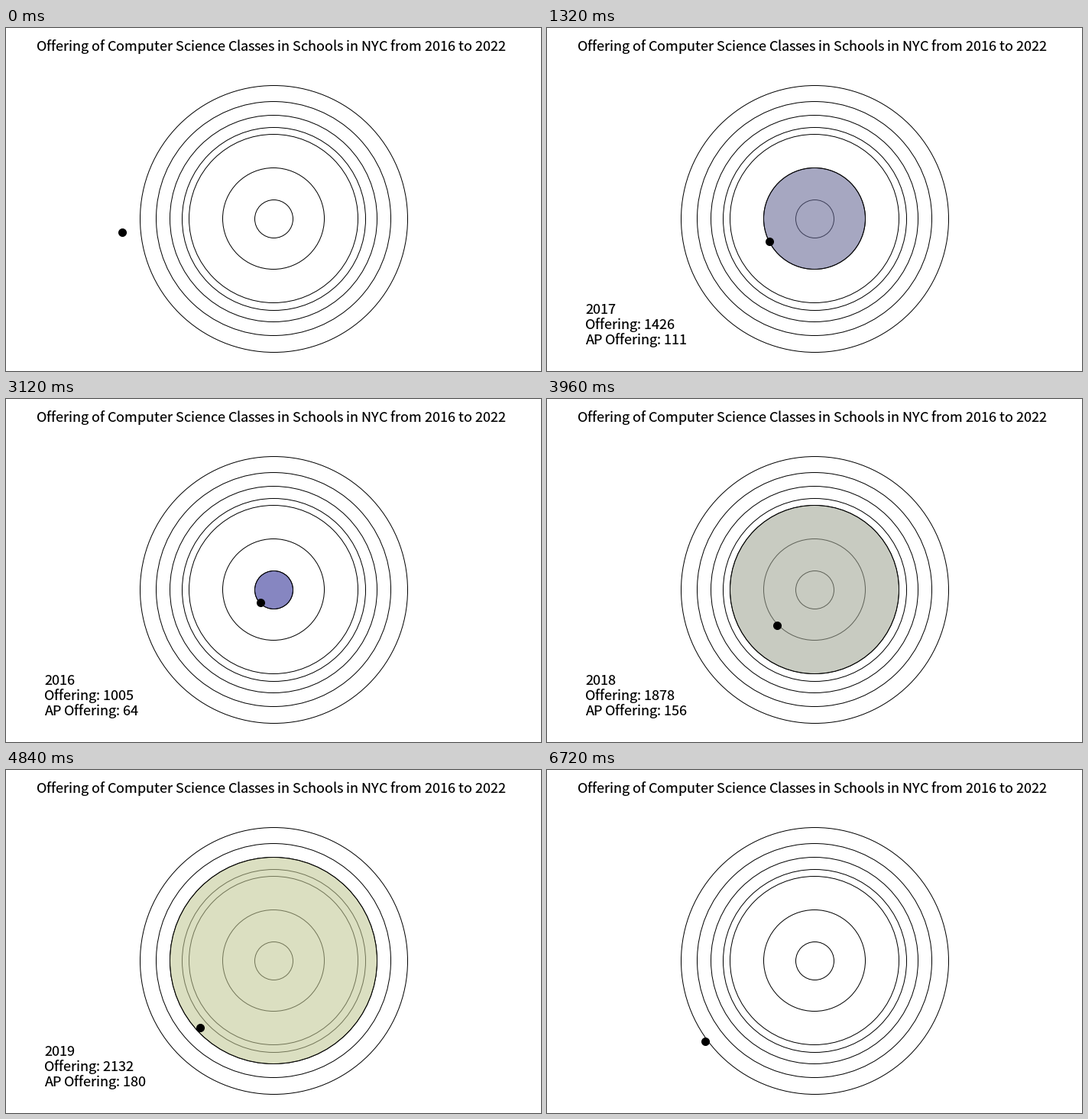
Recreate the animation shown at these times as a matplotlib script. Size 700x450 px, loop 6.76 s.

```python
import numpy as np
import matplotlib.pyplot as plt
from matplotlib.animation import FuncAnimation
from matplotlib.patches import Circle

W, H, DPI = 700, 450, 100
FRAMES, INTERVAL = 169, 40
PX = 72 / DPI
plt.rcParams.update({
    "font.family": "Noto Sans CJK JP",
    "text.hinting": "default",
    "text.hinting_factor": 1,  # whole-pixel letter advances
})

FIRST_YEAR = 2016
CLASSES = [1005, 1426, 1878, 2132, 2316, 1974, 2535]
AP_CLASSES = [64, 111, 156, 180, 201, 172, 218]

# pointer glides: start frame, end frame, goal, ease-out power
START = (152, 268)
GLIDES = [
    (0, 1, (169, 281), 1),
    (8, 33, (291, 280), 3),
    (33, 61, (338, 255), 1),
    (71, 78, (333, 267), 1),
    (78, 99, (301, 297), 1),
    (99, 121, (254, 338), 1),
    (121, 145, (214, 358), 1.5),
    (166, 168, (207, 356), 1),
]

levels = np.interp(CLASSES, [min(CLASSES), max(CLASSES)], [0, 1])
diameters = np.rint(50 + 300 * levels).astype(int)


def tint(level):
    red, green = 50 + 197 * level, 50 + 205 * level
    return tuple(np.array([red, green, 150, 150]) / 255)


def pointer(frame):
    pos = np.array(START, float)
    for start, end, goal, power in GLIDES:
        t = np.clip((frame - start) / (end - start), 0, 1)
        pos += (np.array(goal) - pos) * (1 - (1 - t) ** power)
    return pos


def hovered(pos):
    """Index of the smallest ring around the pointer, or None."""
    dist = np.hypot(*(pos - (350, 250)))
    inside = [i for i, d in enumerate(diameters) if dist < d / 2]
    return min(inside, key=lambda i: diameters[i], default=None)


fig = plt.figure(figsize=(W / DPI, H / DPI), dpi=DPI, facecolor="white")
ax = fig.add_axes([0, 0, 1, 1])
ax.set_xlim(0, W)
ax.set_ylim(H, 0)
ax.axis("off")


def label(x, y, text=""):
    return ax.text(x, y, text, fontsize=18 * PX, color="black", va="baseline")


def disc(x, y, diameter, **style):
    # odd diameters sit half a pixel up and left
    shift = 0.5 - diameter % 2 / 2
    return ax.add_patch(Circle((x + shift, y + shift), diameter / 2,
                               lw=PX, ec="black", **style))


label(40, 30, "Offering of Computer Science Classes in Schools in NYC from 2016 to 2022")
for d in diameters:
    disc(350, 250, d, fill=False, zorder=1)
fills = [disc(350, 250, d, fc=tint(level), zorder=2)
         for d, level in zip(diameters, levels)]
dot = disc(*START, 10, fc="black", zorder=3)
lines = [label(50, y) for y in (375, 395, 415)]


def update(frame):
    pos = pointer(frame).round()
    dot.center = tuple(pos + 0.5)
    active = hovered(pos)
    for i, fill in enumerate(fills):
        fill.set_visible(i == active)
    texts = [""] * 3
    if active is not None:
        texts = [f"{FIRST_YEAR + active}",
                 f"Offering: {CLASSES[active]}",
                 f"AP Offering: {AP_CLASSES[active]}"]
    for line, text in zip(lines, texts):
        line.set_text(text)
    return [*fills, dot, *lines]


anim = FuncAnimation(fig, update, frames=FRAMES, interval=INTERVAL,
                     repeat=True, repeat_delay=0)
plt.show()
```
